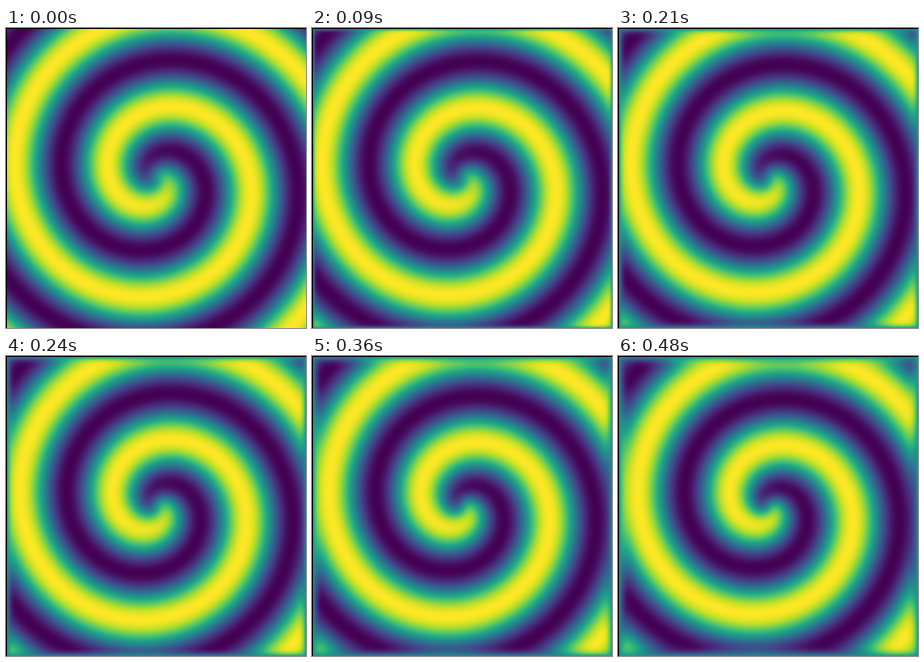
An HTML page with a canvas that plays this animation: 300x300 px, repeating every 0.51 s.

```html
<!DOCTYPE html>
<html lang="en">
<head>
<meta charset="utf-8">
<title>Spiral wave</title>
<style>
  html, body { margin: 0; width: 100%; height: 100%; overflow: hidden; background: #000; }
  canvas { display: block; width: 300px; height: 300px; }
</style>
</head>
<body>
<canvas id="stage" width="300" height="300"></canvas>
<script>
const SIZE = 300, N = 299, W = N + 2;
const LOOP = 510, TICK = 30, STEPS = 16;
const SPAN = 20, H = SPAN / N;
const DIFFUSION = 0.1, BETA = 1;
const DT = 0.005, SUBSTEPS = 10;

const VIRIDIS = [
  [68, 1, 84], [72, 36, 117], [65, 68, 135], [53, 95, 141],
  [42, 120, 142], [33, 145, 140], [34, 168, 132], [68, 191, 112],
  [122, 209, 81], [189, 223, 38], [253, 231, 37]
];

const ctx = document.getElementById('stage').getContext('2d');
const field = () => new Float32Array(W * W);

function eachCell(fn) {
  for (let y = 1; y <= N; y++)
    for (let x = 1; x <= N; x++) fn(y * W + x, x, y);
}

// 256-entry colour ramp
const ramp = Array.from({ length: 256 }, (_, i) => {
  const p = i / 255 * (VIRIDIS.length - 1);
  const k = Math.min(Math.floor(p), VIRIDIS.length - 2);
  return VIRIDIS[k].map((c, j) => c + (VIRIDIS[k + 1][j] - c) * (p - k));
});

// Lambda-omega reaction-diffusion; the zero padding holds the walls at rest
let u = field(), v = field(), u2 = field(), v2 = field();

eachCell((i, x, y) => {
  const px = (x - 0.5) * H - SPAN / 2, py = (y - 0.5) * H - SPAN / 2;
  const r = Math.hypot(px, py), phase = Math.atan2(py, px) - r;
  u[i] = Math.tanh(r) * Math.cos(phase);
  v[i] = Math.tanh(r) * Math.sin(phase);
});

function advance() {
  const k = DIFFUSION / (H * H);
  const spread = (f, i) => k * (f[i - 1] + f[i + 1] + f[i - W] + f[i + W] - 4 * f[i]);
  eachCell(i => {
    const a = u[i], b = v[i], s = a * a + b * b;
    u2[i] = a + DT * ((1 - s) * a + BETA * s * b + spread(u, i));
    v2[i] = b + DT * ((1 - s) * b - BETA * s * a + spread(v, i));
  });
  [u, u2, v, v2] = [u2, u, v2, v];
}

function paint() {
  const img = ctx.createImageData(SIZE, SIZE);
  for (let i = 3; i < img.data.length; i += 4) img.data[i] = 255;
  let peak = 0;
  eachCell(i => { peak = Math.max(peak, Math.abs(u[i])); });
  eachCell((i, x, y) => {
    const c = ramp[Math.round((u[i] / peak + 1) * 127.5)];
    const o = (y * SIZE + x) * 4;
    for (let j = 0; j < 3; j++) img.data[o + j] = c[j];
  });
  return img;
}

const images = [];
for (let n = 0; n < STEPS; n++) {
  images.push(paint());
  for (let s = 0; s < SUBSTEPS; s++) advance();
}

let shown = -1;
function draw(ms) {
  const n = Math.max(0, Math.floor((ms % LOOP) / TICK) - 1);
  if (n !== shown) ctx.putImageData(images[shown = n], 0, 0);
}

draw(0);
let start = null;
function loop(now) {
  if (start === null) start = now;
  draw(Math.max(0, now - start));
  requestAnimationFrame(loop);
}
requestAnimationFrame(loop);
</script>
</body>
</html>
```
